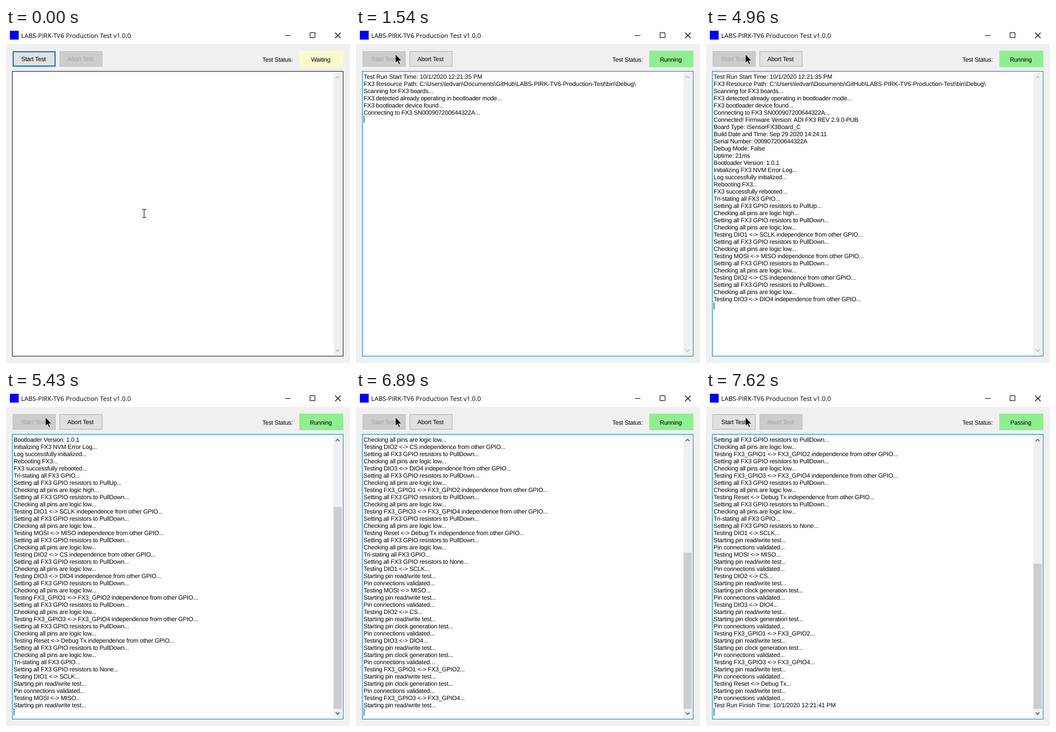
An HTML page that plays this animation: 624 px wide and 607 px high, repeating every 8 s.

```html
<!DOCTYPE html>
<html lang="en">
<head>
<meta charset="utf-8">
<title>Production Test</title>
<style>
  html, body { margin: 0; width: 100%; height: 100%; overflow: hidden; background: #f0f0f0; }
  svg { display: block; }
  text {
    font: 11px "Liberation Sans", Arial, sans-serif;
    letter-spacing: -.18px;
    text-rendering: geometricPrecision;
    white-space: pre;
  }
  .title { font: 11.5px "Open Sans", "Noto Sans", sans-serif; letter-spacing: 0; }
  .wide { letter-spacing: -.04px; }
  .mid { text-anchor: middle; }
  .line { fill: none; stroke: #000; }
</style>
</head>
<body>
<svg width="624" height="607" viewBox="0 0 624 607">
  <rect width="624" height="607" fill="#f0f0f0"/>
  <rect width="624" height="29" fill="#fff"/>
  <rect x="7" y="5" width="16" height="16" fill="#0000f0"/>
  <text class="title" x="27.5" y="18">LABS-PIRK-TV6 Production Test v1.0.0</text>
  <path class="line" d="M506 13.5h10M551.5 8.5h9v9h-9z"/>
  <path class="line" d="M597 8.5l10 10M607 8.5l-10 10" stroke-width="1.1"/>

  <g id="start"><rect/><text class="mid" x="50" y="60">Start Test</text></g>
  <g id="abort"><rect/><text class="mid" x="135" y="60">Abort Test</text></g>
  <text x="465" y="61">Test Status:</text>
  <rect id="statusBox" x="532" y="41" width="80" height="30"/>
  <text id="status" class="mid" x="571" y="61"></text>

  <rect id="box" x="11.5" y="78.5" width="600" height="516" fill="#fff"/>
  <rect x="594" y="80" width="16" height="513" fill="#f0f0f0"/>
  <rect id="thumb" x="594" width="15" fill="#cdcdcd"/>
  <path id="arrows" d="M598 91l3.5-3.5 3.5 3.5M598 582.5l3.5 3.5 3.5-3.5" fill="none" stroke-width="1.7"/>
  <g id="log"></g>
  <rect id="caret" x="14" width="1" height="13"/>

  <path id="beam" class="line" d="M-3-7.5h2.5l.5.5.5-.5H4M.5-7V7M-3 7.5h2.5l.5-.5.5.5H4"/>
  <path id="arrow" d="M.5.5v16l3.7-3.5 2.6 6 2.4-1-2.6-5.8h5z" stroke="#fff" stroke-width=".8"/>
</svg>
<script>
const $ = id => document.getElementById(id);
const LOOP = 8000, ROW = 13, ROWS = 39, TRACK = 479, TRACK_END = 576;

const set = (el, attrs) => {
  for (const name in attrs) el.setAttribute(name, attrs[name]);
};
const show = (el, on) => set(el, { visibility: on ? 'visible' : 'hidden' });

// Log text
const pairs = ['DIO1 <-> SCLK', 'MOSI <-> MISO', 'DIO2 <-> CS', 'DIO3 <-> DIO4',
  'FX3_GPIO1 <-> FX3_GPIO2', 'FX3_GPIO3 <-> FX3_GPIO4', 'Reset <-> Debug Tx'];
const clocked = [2, 3, 4];
const pull = mode => `Setting all FX3 GPIO resistors to ${mode}...`;
const check = level => `Checking all pins are logic ${level}...`;
const pullLow = [pull('PullDown'), check('low')];

const lines = [
  'Test Run Start Time: 10/1/2020 12:21:35 PM',
  'FX3 Resource Path: C:\\Users\\ledvan\\Documents\\GitHub\\LABS-PIRK-TV6-Production-Test\\bin\\Debug\\',
  'Scanning for FX3 boards...',
  'FX3 detected already operating in bootloader mode...',
  'FX3 bootloader device found...',
  'Connecting to FX3 SN000907200644322A...',
  'Connected! Firmware Version: ADI FX3 REV 2.9.0-PUB',
  'Board Type: iSensorFX3Board_C',
  'Build Date and Time: Sep 29 2020 14:24:11',
  'Serial Number: 000907200644322A',
  'Debug Mode: False',
  'Uptime: 21ms',
  'Bootloader Version: 1.0.1',
  'Initializing FX3 NVM Error Log...',
  'Log successfully initialized...',
  'Rebooting FX3...',
  'FX3 successfully rebooted...',
  'Tri-stating all FX3 GPIO...',
  pull('PullUp'), check('high'), ...pullLow,
  ...pairs.flatMap(p => [`Testing ${p} independence from other GPIO...`, ...pullLow]),
  'Tri-stating all FX3 GPIO...',
  pull('None'),
  ...pairs.flatMap((p, i) => [
    `Testing ${p}...`,
    'Starting pin read/write test...',
    ...(clocked.includes(i) ? ['Starting pin clock generation test...'] : []),
    'Pin connections validated...'
  ]),
  'Test Run Finish Time: 10/1/2020 12:21:41 PM'
];

const rows = lines.map((line, i) => {
  const el = document.createElementNS('http://www.w3.org/2000/svg', 'text');
  set(el, { x: 13.8, y: 92 + ROW * i });
  if (/\\|PM$/.test(line)) el.classList.add('wide');
  el.textContent = line;
  return $('log').appendChild(el);
});

// [time, number of lines written]
const progress = [[0, 0], [1380, 2], [1460, 4], [1540, 6], [2340, 16], [4890, 22], [4960, 32],
  [5030, 47], [5430, 50], [5730, 53], [6130, 57], [6530, 61], [6890, 65], [7220, 68], [7620, 70]];
const caretOff = [[0, 1380], [2070, 2340], [2870, 3400], [3960, 4490], [7220, 7290]];

const looks = {
  focus: ['#e1e1e1', '#0078d7', 2, '#000'],
  hover: ['#e5f1fb', '#0078d7', 1, '#000'],
  pressed: ['#cce4f7', '#005499', 1, '#000'],
  normal: ['#e1e1e1', '#adadad', 1, '#000'],
  disabled: ['#cccccc', '#bfbfbf', 1, '#a0a0a0']
};

function drawButton(id, x, look) {
  const [fill, stroke, width, color] = looks[look];
  const [rect, label] = $(id).children;
  set(rect, { x: x + width / 2, y: 42 + width / 2, width: 78 - width, height: 28 - width,
    fill, stroke, 'stroke-width': width });
  set(label, { fill: color });
}

function pointerAt(t) {
  if (t >= 1000) return [71, 47];
  const step = t < 180 ? 0 : Math.min(10, Math.floor((t - 180) / 80) + 1);
  const k = (1 - Math.cos(Math.PI * step / 10)) / 2;
  return [Math.round(250 - 176 * k), Math.round(336 - 280 * k)];
}

function drawLog(t) {
  const count = progress.findLast(([at]) => at <= t)[1];
  const first = Math.max(0, count + 1 - ROWS);
  const scrolls = first > 0;
  rows.forEach((row, i) => show(row, i >= first && i < count));
  set($('log'), { transform: `translate(0 ${-ROW * first})` });
  set($('caret'), { y: 81 + ROW * (count - first) });
  show($('caret'), !caretOff.some(([from, to]) => t >= from && t < to));

  const height = Math.round(TRACK * ROWS / (count + 1));
  show($('thumb'), scrolls);
  if (scrolls) set($('thumb'), { y: TRACK_END - height, height });
  set($('arrows'), { stroke: scrolls ? '#606060' : '#bfbfbf' });
}

function draw(t) {
  const started = t >= 1380, done = t >= 7620;
  const [x, y] = pointerAt(t);
  const overBox = y >= 78, overStart = x < 90 && y >= 42 && y < 70;

  drawButton('start', 12, done ? 'normal' : started ? 'disabled'
    : t >= 1300 ? 'pressed' : overStart ? 'hover' : 'focus');
  drawButton('abort', 97, started && !done ? 'normal' : 'disabled');
  $('status').textContent = done ? 'Passing' : started ? 'Running' : 'Waiting';
  set($('statusBox'), { fill: started ? '#90ee90' : '#fafad2' });
  set($('box'), { stroke: started ? '#0078d7' : overBox ? '#171717' : '#7a7a7a' });
  drawLog(t);

  for (const id of ['beam', 'arrow']) {
    set($(id), { transform: `translate(${x} ${y})` });
    show($(id), (id === 'beam') === overBox);
  }
}

const begin = performance.now();
function tick() {
  draw((performance.now() - begin) % LOOP);
  requestAnimationFrame(tick);
}
tick();
</script>
</body>
</html>
```
